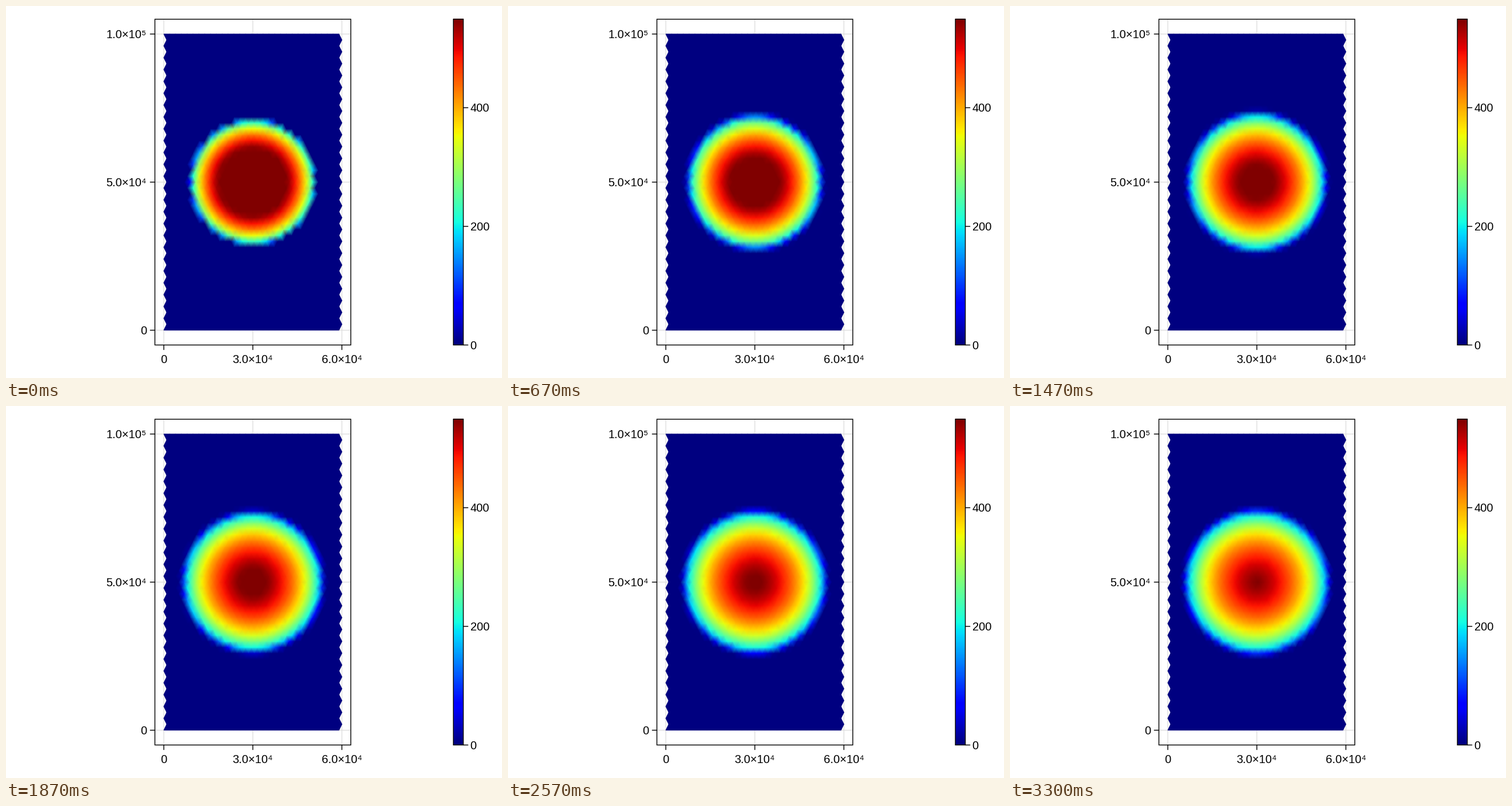
Recreate the animation shown at these times as a matplotlib script. Size 864 by 648 pixels, loop 3.33 s.

```python
import numpy as np
import matplotlib.pyplot as plt
from matplotlib.animation import FuncAnimation
from matplotlib.patches import Rectangle
from matplotlib.tri import Triangulation

W, H, DPI = 864, 648, 100
FRAMES, LOOP_MS = 100, 3330
U = 1.44                                # layout unit in pixels
PT = 72 / DPI
LINE = U * PT
FONT = ["Liberation Sans", "DejaVu Sans"]

# Plot box and colour bar, in pixels from the top left
LEFT, RIGHT, TOP, BOTTOM = 259.4, 600.6, 23.04, 590.5
BAR_L, BAR_R = 779.3, 796.6
X0, X1 = 274.9, 585.1                   # 0 and 60 km
Y0, Y1 = 564.7, 48.8                    # 0 and 100 km
H_MAX = 549.2

# Staggered triangle mesh, squeezed so that the shifted rows fit
LX, LY, STEP = 60e3, 100e3, 2e3
SCALE = LX / (LX + STEP / 2)
NX, NY = int(LX / STEP) + 1, int(LY / STEP) + 1
DX, DY = STEP * SCALE, STEP

# Ice dome: Glen's law with n = 3
DOME_H, DOME_R = 707.1, 21213.2
GAMMA = 2 / 5 * 1e-16 * (910 * 9.8101) ** 3
YEARS, SUBSTEPS = 200, 90

row, col = (a.ravel() for a in np.mgrid[0:NY, 0:NX])
odd = row % 2
x = (col + odd / 2) * DX
y = row * DY


def node(r, c):
    return (r % NY) * NX + c % NX


def mesh_triangles():
    tris = []
    for r in range(NY - 1):
        for c in range(NX - 1):
            a, b = node(r, c), node(r, c + 1)
            d, e = node(r + 1, c), node(r + 1, c + 1)
            tris += [(a, b, e), (a, e, d)] if r % 2 else [(a, b, d), (b, e, d)]
    return tris


def simulate():
    """Shallow-ice flow of the dome; returns the thickness for each frame."""
    east, west = node(row, col + 1), node(row, col - 1)
    ne, nw = node(row + 1, col + odd), node(row + 1, col + odd - 1)
    se, sw = node(row - 1, col + odd), node(row - 1, col + odd - 1)
    near = np.array([east, west, ne, nw, se, sw])

    t = DX / 2 / DY
    flat = (1 - t * t) / (2 * t)
    weight = np.array([flat, flat, t, t, t, t])
    dt = YEARS / (FRAMES - 1) / SUBSTEPS
    rate = weight * GAMMA * dt / (4 * DX * DY)

    r = np.hypot(x - LX / 2, y - LY / 2) / DOME_R
    h = DOME_H * np.maximum(1 - r ** (4 / 3), 0) ** (3 / 7)
    states = [h]
    for _ in range(FRAMES - 1):
        for _ in range(SUBSTEPS):
            n = h[near]
            gx = (2 * (n[0] - n[1]) + n[2] - n[3] + n[4] - n[5]) / (6 * DX)
            gy = (n[2] + n[3] - n[4] - n[5]) / (4 * DY)
            slope2 = gx * gx + gy * gy
            h2 = h * h
            h5 = h2 * h2 * h
            flux = (h5[near] + h5) * (slope2[near] + slope2) * (n - h)
            h = np.maximum(h + rate @ flux, 0)
        states.append(h)
    return states


fig = plt.figure(figsize=(W / DPI, H / DPI), dpi=DPI, facecolor="white")
ax = fig.add_axes([0, 0, 1, 1])
ax.axis("off")


def line(xs, ys, color="black", z=5):
    ax.plot(xs, ys, color=color, lw=LINE, zorder=z, snap=False,
            solid_capstyle="butt")


def box(left, right):
    ax.add_patch(Rectangle((left, TOP), right - left, BOTTOM - TOP, fill=False,
                           ec="black", lw=LINE, zorder=6, snap=False))


def label(px, py, text, ha):
    ax.text(px, py + 7.2, text, ha=ha, va="baseline", family=FONT,
            size=14 * U * PT, color="black")


TICK = 6 * U
GRID = "#e0e0e0"
for f, text in [(0, "0"), (0.5, "3.0×10⁴"), (1, "6.0×10⁴")]:
    px = X0 + f * (X1 - X0)
    line([px, px], [TOP, BOTTOM], GRID, 1)
    line([px, px], [BOTTOM, BOTTOM + TICK])
    label(px, 615, text, "center")
for f, text in [(0, "0"), (0.5, "5.0×10⁴"), (1, "1.0×10⁵")]:
    py = Y0 + f * (Y1 - Y0)
    line([LEFT, RIGHT], [py, py], GRID, 1)
    line([LEFT - TICK, LEFT], [py, py])
    label(245.2, py, text, "right")
for v in (0, 200, 400):
    py = BOTTOM - v / H_MAX * (BOTTOM - TOP)
    line([BAR_R, BAR_R + TICK], [py, py])
    label(808.6, py, str(v), "left")

ax.imshow(np.linspace(1, 0, 256)[:, None], cmap="jet", aspect="auto",
          extent=(BAR_L, BAR_R, BOTTOM, TOP), zorder=2)
box(LEFT, RIGHT)
box(BAR_L, BAR_R)

states = simulate()
mesh = Triangulation(X0 + x / LX * (X1 - X0), Y0 + y / LY * (Y1 - Y0),
                     mesh_triangles())
ice = ax.tripcolor(mesh, states[0], shading="gouraud", cmap="jet",
                   vmin=0, vmax=H_MAX, zorder=3)
ax.set_xlim(0, W)
ax.set_ylim(H, 0)


def update(i):
    ice.set_array(states[i])
    return [ice]


anim = FuncAnimation(fig, update, frames=FRAMES, interval=LOOP_MS / FRAMES,
                     repeat=True, repeat_delay=0, blit=False)
plt.show()
```
